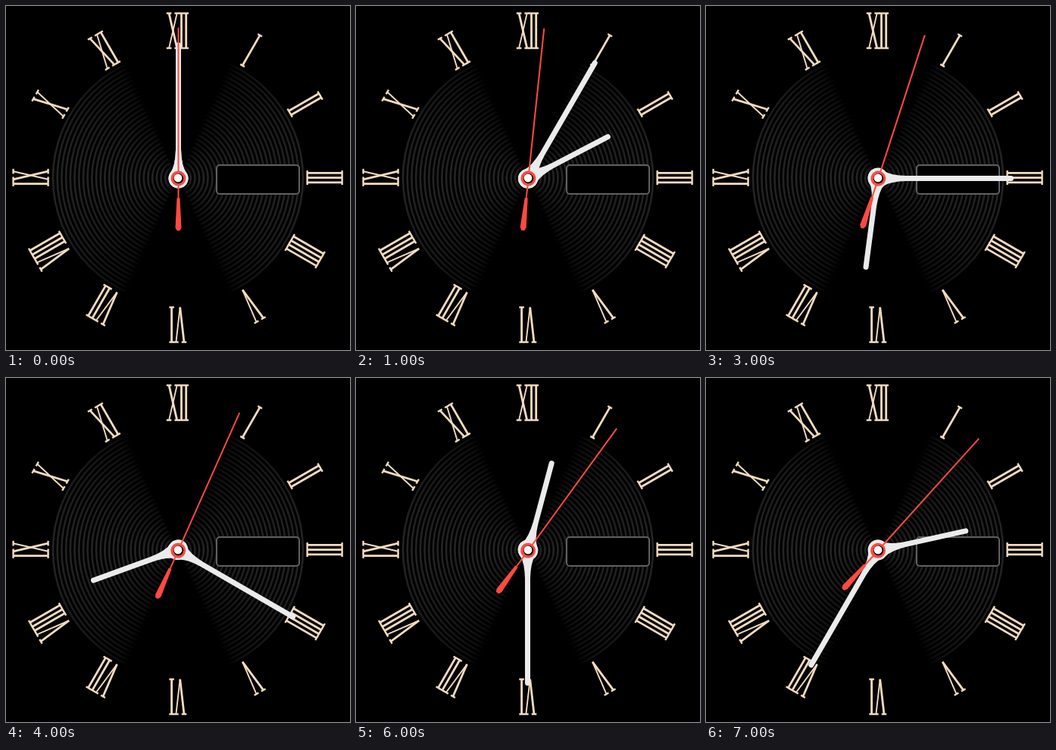
These frames come from a looping animation (454 by 454 pixels, 8 s). An HTML page with a canvas:

```html
<!DOCTYPE html>
<html>
<head>
<meta charset="utf-8">
<style>
html, body { margin: 0; width: 100%; height: 100%; overflow: hidden; background: #000; }
canvas { display: block; }
</style>
</head>
<body>
<canvas id="stage" width="454" height="454"></canvas>
<script>
const ctx = document.getElementById('stage').getContext('2d');
const CENTER = 227, OUTER = -217, INNER = -171;
const CREAM = '#f3dcc0', WHITE = '#ebebeb', RED = '#ff4a42';
const NUMERALS = ['XII', 'I', 'II', 'III', 'IIII', 'V', 'VI', 'VII', 'VIII', 'IX', 'X', 'XI'];
const ADVANCE = { I: 6.2, V: 16, X: 16 };
const ARM = 5.3, THICK = 2.8, THIN = 1.9;

function rotated(degrees, draw, center = CENTER) {
  ctx.save();
  ctx.translate(center, center);
  ctx.rotate(degrees * Math.PI / 180);
  draw();
  ctx.restore();
}

function line(x1, y1, x2, y2, width) {
  ctx.lineWidth = width;
  ctx.beginPath();
  ctx.moveTo(x1, y1);
  ctx.lineTo(x2, y2);
  ctx.stroke();
}

function disc(radius, color, x = 0, y = 0) {
  ctx.fillStyle = color;
  ctx.beginPath();
  ctx.arc(x, y, radius, 0, 7);
  ctx.fill();
}

const serif = (x, y) => line(x - 3.3, y, x + 3.3, y, 2.4);

const glyphs = {
  I(x) {
    line(x, OUTER, x, INNER, THICK);
    serif(x, OUTER);
    serif(x, INNER);
  },
  V(x) {
    line(x - ARM, OUTER, x, INNER, THICK);
    line(x + ARM, OUTER, x, INNER, THIN);
    serif(x - ARM, OUTER);
    serif(x + ARM, OUTER);
  },
  X(x) {
    line(x - ARM, OUTER, x + ARM, INNER, THICK);
    line(x + ARM, OUTER, x - ARM, INNER, THIN);
    for (const side of [-ARM, ARM]) {
      serif(x + side, OUTER);
      serif(x + side, INNER);
    }
  }
};

function numeral(text) {
  const letters = [...text];
  let x = -letters.reduce((sum, c) => sum + ADVANCE[c], 0) / 2;
  ctx.strokeStyle = CREAM;
  for (const c of letters) {
    glyphs[c](x + ADVANCE[c] / 2);
    x += ADVANCE[c];
  }
}

// Grooves are brightest at the sides and vanish towards top and bottom.
const sheen = ctx.createConicGradient(-Math.PI / 2, CENTER, CENTER);
for (const half of [0, 0.5]) {
  for (const [at, gray] of [[0, 0], [0.066, 0], [0.08, 14], [0.14, 26], [0.25, 37], [0.36, 26], [0.42, 14], [0.434, 0], [0.5, 0]]) {
    sheen.addColorStop(half + at, `rgb(${gray},${gray},${gray})`);
  }
}

function dial() {
  ctx.fillStyle = '#000';
  ctx.fillRect(0, 0, 454, 454);
  ctx.strokeStyle = sheen;
  ctx.lineWidth = 2.6;
  for (let radius = 165; radius > 12; radius -= 5.7) {
    ctx.beginPath();
    ctx.arc(CENTER, CENTER, radius, 0, 7);
    ctx.stroke();
  }
  ctx.beginPath();
  ctx.roundRect(278, 210, 109, 38, 4);
  ctx.fillStyle = '#000';
  ctx.fill();
  ctx.strokeStyle = '#606060';
  ctx.lineWidth = 2;
  ctx.stroke();
  NUMERALS.forEach((text, i) => rotated(i * 30, () => numeral(text), CENTER - 0.4));
}

function hand(degrees, length) {
  rotated(degrees, () => {
    ctx.translate(0.5, 0.5);
    disc(13, WHITE);
    ctx.beginPath();
    ctx.moveTo(-10, -8);
    ctx.quadraticCurveTo(-4, -17, -3.5, -38);
    ctx.lineTo(-3.5, 4 - length);
    ctx.arc(0, 4 - length, 3.5, Math.PI, 0);
    ctx.lineTo(3.5, -38);
    ctx.quadraticCurveTo(4, -17, 10, -8);
    ctx.fill();
  });
}

function secondHand(degrees) {
  rotated(degrees, () => {
    ctx.translate(0.5, 0.5);
    ctx.strokeStyle = RED;
    line(0, -199, 0, 30, 2);
    disc(10, RED);
    ctx.beginPath();
    for (const [x, y] of [[-2, 26], [2, 26], [4, 65], [2, 69], [-2, 69], [-4, 65]]) ctx.lineTo(x, y);
    ctx.fill();
  });
  disc(6.6, '#000', CENTER + 0.6, CENTER + 0.6);
  disc(5.4, '#fff', CENTER, CENTER);
}

function frame() {
  const tick = Math.floor(performance.now() / 1000) % 8;
  dial();
  hand(tick * 62.5, 123);
  hand(tick * 30, 180);
  secondHand(tick * 6);
  requestAnimationFrame(frame);
}
frame();
</script>
</body>
</html>
```
